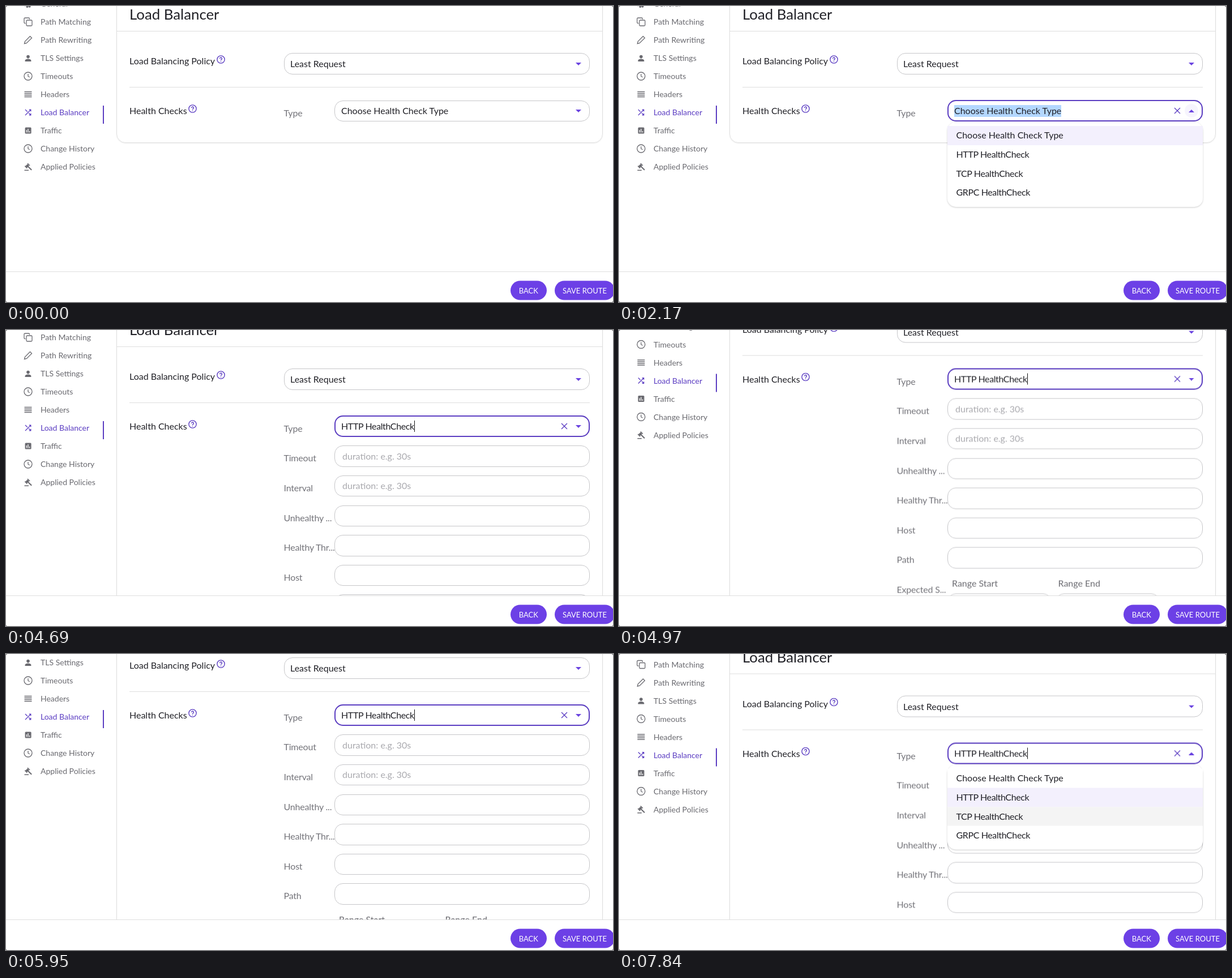
These frames come from a looping animation (1072x523 px, 8 s). An HTML page:

```html
<!DOCTYPE html>
<html lang="en">
<head>
<meta charset="utf-8">
<title>Load Balancer settings</title>
<style>
@property --s { syntax: "<length>"; inherits: true; initial-value: 0px; }

html, body { margin: 0; width: 100%; height: 100%; overflow: hidden; background: #555; }
#stage {
  --line: #dedede; --accent: #5b3dc2; --vivid: #6a43e0;
  position: absolute; inset: 0; overflow: hidden; background: #fff; border-radius: 3px;
  font: 16px/20px Lato, "Open Sans", sans-serif; color: #212127; white-space: nowrap;
  animation: scroll 8s infinite;
}
#stage *, #stage *::after { box-sizing: border-box; }
#stage div, #stage p, #stage svg { position: absolute; margin: 0; }
svg { fill: none; stroke: currentColor; overflow: visible; }

.view { left: 0; top: 0; width: 100%; height: 470px; overflow: hidden; }
.page { inset: 0; transform: translateY(calc(-1 * var(--s))); }
.side { left: 0; top: -20.5px; transform: translateY(calc(-1 * min(var(--s), 124px))); color: #6a6a70; font-size: 14px; }
#stage .side p { position: relative; left: 61px; height: 32px; line-height: 31px; }
.side svg { left: -30.5px; top: 8.5px; width: 16px; height: 16px; stroke-width: 1.3; }
.side .on { color: var(--accent); }
.side .on::after { content: ""; position: absolute; left: 110px; top: 4.5px; width: 2px; height: 32px; background: var(--accent); }

.panel {
  left: 195px; top: -60px; width: 859px; height: 302px; border: 1px solid var(--line);
  border-radius: 16px; box-shadow: 0 1px 2px #0001; animation: grow 8s step-end infinite;
}
.rule { height: 1px; background: var(--line); }
.field { left: 580px; width: 451px; height: 37.5px; border: 1px solid #c6c6c9; border-radius: 15px; background: #fff; }
.field p { left: 11px; top: 7.5px; }
.field .hint { left: 13px; color: #a9a9ae; }
.label { left: 490.5px; color: #74747a; letter-spacing: -.2px; }
.tight { letter-spacing: -.38px; }
.arrow { left: 1006px; width: 10px; height: 5px; fill: var(--vivid); stroke: none; }
.help { width: 15px; height: 15px; color: var(--accent); stroke-width: 1.4; }
.focus { left: 580px; top: 166px; width: 451px; height: 38px; border: 2px solid var(--accent); border-radius: 15px; animation: focus 8s step-end infinite; }
.focus svg { left: 399px; top: 12px; width: 10px; height: 10px; color: var(--accent); stroke-width: 1.4; }
.halo { left: 998.5px; top: 172.5px; width: 24px; height: 24px; border-radius: 50%; background: var(--vivid); opacity: 0; animation: halo 8s infinite; }
.value { left: 592px; top: 174.5px; }
.value span { display: inline-block; height: 21px; }
.caret::after { content: ""; display: inline-block; width: 1px; height: 20px; background: #111; vertical-align: top; animation: blink 8s step-end infinite; }
.first { animation: first 8s step-end infinite; }
.first span { animation: select 8s step-end infinite; }
.second, .rows { animation: second 8s step-end infinite; }
.flip { top: 182.5px; animation: flip 8s step-end infinite; }

.rows { left: 0; top: 219.2px; }
#stage .row { position: relative; height: 52.67px; }
.row .label { top: 12px; }
.row .field { top: 0; }
.sub { color: #6a6a70; }
.pm { width: 20px; height: 20px; color: var(--vivid); stroke-width: 1.6; }
.hover { animation: hover 8s step-end infinite; }

.menu {
  left: 580px; top: 204.5px; width: 451px; height: 150.5px; padding-top: 7.5px; border-radius: 15px;
  background: #fff; box-shadow: 0 1px 3px #0003; animation: menu 8s step-end infinite;
}
#stage .menu p { position: relative; height: 33.8px; padding-left: 15.5px; line-height: 32.6px; }
.o1 { animation: o1 8s step-end infinite; }
.o2 { animation: o2 8s step-end infinite; }
.o3 { animation: o3 8s step-end infinite; }

.foot { left: 0; top: 469px; width: 100%; height: 54px; border-top: 1px solid var(--line); background: #fff; }
.btn {
  top: 15px; height: 34px; border-radius: 17px; background: #6c40e6; transform: translateY(.5px);
  color: #fff; font-size: 13px; line-height: 34px; text-align: center;
}

@keyframes scroll {
  0%, 57.75% { --s: 0px; animation-timing-function: steps(2); }
  59.5% { --s: 30px; animation-timing-function: steps(3); }
  62.125% { --s: 98.5px; animation-timing-function: steps(3); }
  64.75% { --s: 142px; animation-timing-function: steps(4); }
  68.25% { --s: 166px; animation-timing-function: steps(2); }
  70% { --s: 150px; animation-timing-function: steps(5); }
  74.375% { --s: 77px; animation-timing-function: steps(2); }
  76.125% { --s: 42px; animation-timing-function: steps(3); }
  78.75%, 100% { --s: 9.5px; }
}
@keyframes grow { 0% { height: 302px; } 45.5%, 100% { height: 1100px; } }
@keyframes focus { 0% { opacity: 0; } 17.5%, 100% { opacity: 1; } }
@keyframes first { 0% { opacity: 1; } 45.5%, 100% { opacity: 0; } }
@keyframes second { 0% { opacity: 0; } 45.5%, 100% { opacity: 1; } }
@keyframes select { 0% { background: #b3d7ff00; } 18.375%, 100% { background: #b3d7ff; } }
@keyframes blink {
  0%, 18.375%, 52.5%, 65.625%, 78.75%, 91.875% { opacity: 0; }
  17.5%, 45.5%, 58.625%, 71.75%, 84.875%, 98%, 100% { opacity: 1; }
}
@keyframes menu {
  0%, 28%, 45.5% { opacity: 0; }
  22.75%, 32.375%, 89.25%, 100% { opacity: 1; }
}
@keyframes flip {
  0%, 28%, 45.5% { transform: none; }
  22.75%, 32.375%, 89.25%, 100% { transform: rotate(180deg); }
}
@keyframes halo {
  0%, 22.74% { opacity: 0; }
  24.5% { opacity: .12; }
  28%, 32.37% { opacity: .05; }
  34% { opacity: .12; }
  35.875%, 37.62% { opacity: .05; }
  37.625%, 89.24% { opacity: 0; }
  91% { opacity: .12; }
  93.625%, 100% { opacity: 0; }
}
@keyframes hover { 0%, 80.5%, 100% { border-color: #c6c6c9; } 79.625% { border-color: #333; } }
@keyframes o1 { 0% { background: #f3f0fd; } 45.5%, 100% { background: #fff; } }
@keyframes o2 { 0% { background: #fff; } 39.375% { background: #f4f4f4; } 45.5%, 100% { background: #f3f0fd; } }
@keyframes o3 { 0% { background: #fff; } 95.375%, 100% { background: #f4f4f4; } }
</style>
</head>
<body>
<svg width="0" height="0" style="position:absolute">
  <symbol id="clock" viewBox="0 0 16 16"><circle cx="8" cy="8" r="7"/><path d="M8 4v4.2l2.8 1.6"/></symbol>
  <symbol id="ask" viewBox="0 0 15 15"><circle cx="7.5" cy="7.5" r="6.6"/><path d="M5.6 6a1.9 1.9 0 1 1 2.7 1.7q-.8.4-.8 1.3M7.5 10.2v1.3"/></symbol>
  <symbol id="down" viewBox="0 0 10 5"><path d="M0 0h10L5 5z"/></symbol>
</svg>

<div id="stage">
  <div class="view">
    <div class="side">
      <p><svg><circle cx="8" cy="8" r="6" stroke-width="2.4" stroke-dasharray="3 1.7"/><circle cx="8" cy="8" r="5"/><circle cx="8" cy="8" r="2"/></svg>General</p>
      <p><svg><path d="M3.5 10.5h-1A1.5 1.5 0 0 1 1 9V2.5A1.5 1.5 0 0 1 2.5 1H9a1.5 1.5 0 0 1 1.5 1.5v1"/><rect x="5" y="5" width="10" height="10" rx="1.5"/></svg>Path Matching</p>
      <p><svg><path d="M1.5 14.5l1-4 9-9 3 3-9 9z"/></svg>Path Rewriting</p>
      <p><svg style="fill:currentColor;stroke:none"><circle cx="8" cy="5.6" r="2.8"/><path d="M2.6 14v-1.5c0-4 10.8-4 10.8 0V14z"/></svg>TLS Settings</p>
      <p><svg><use href="#clock"/></svg>Timeouts</p>
      <p><svg><path d="M1.5 3.5h13m-13 3h13m-13 3h13m-13 3h13"/></svg>Headers</p>
      <p class="on"><svg><path d="M3 3l3.8 3.8M9.2 9.2L13 13M13 3L3 13M9.8 3.2h3v3M9.8 12.8h3v-3"/></svg>Load Balancer</p>
      <p><svg><rect x="2.6" y="2.6" width="11" height="11" rx="1.5" style="fill:currentColor;stroke:none"/><path d="M5.4 7v4.5M8 5v6.5M10.6 9v2.5" stroke="#fff"/></svg>Traffic</p>
      <p><svg><use href="#clock"/></svg>Change History</p>
      <p><svg><path d="M4.8 8.2l3.6-3.6" stroke-width="4"/><path d="M7 6.8l7.2 7" stroke-width="2"/><path d="M2.4 6.6l4 4M7 2l4 4M1.5 14.2h7.5" stroke-width="1.6"/></svg>Applied Policies</p>
    </div>

    <div class="page">
      <div class="panel"></div>
      <p style="left:218px;top:-1px;font-size:25.8px;line-height:30px">Load Balancer</p>
      <div class="rule" style="left:195px;top:44px;width:858px"></div>

      <p style="left:218px;top:87px">Load Balancing Policy</p>
      <svg class="help" style="left:371.5px;top:86.5px"><use href="#ask"/></svg>
      <div class="field" style="left:490.5px;top:83px;width:540px"><p style="left:10.5px">Least Request</p></div>
      <svg class="arrow" style="top:99.5px"><use href="#down"/></svg>
      <div class="rule" style="left:218px;top:143px;width:813px"></div>

      <p style="left:218px;top:174.5px">Health Checks</p>
      <svg class="help" style="left:321.5px;top:174px"><use href="#ask"/></svg>
      <p class="label" style="top:178.5px">Type</p>
      <div class="field" style="top:166.5px"></div>
      <div class="focus"><svg><path d="M0 0l10 10M10 0L0 10"/></svg></div>
      <div class="halo"></div>
      <svg class="arrow flip"><use href="#down"/></svg>
      <p class="value first caret"><span>Choose Health Check Type</span></p>
      <p class="value second caret tight"><span>HTTP HealthCheck</span></p>

      <div class="rows">
        <div class="row"><p class="label">Timeout</p><div class="field"><p class="hint">duration: e.g. 30s</p></div></div>
        <div class="row"><p class="label">Interval</p><div class="field hover"><p class="hint">duration: e.g. 30s</p></div></div>
        <div class="row"><p class="label">Unhealthy ...</p><div class="field"></div></div>
        <div class="row"><p class="label">Healthy Thr...</p><div class="field"></div></div>
        <div class="row"><p class="label">Host</p><div class="field"></div></div>
        <div class="row"><p class="label">Path</p><div class="field"></div></div>
        <div class="row" style="height:81.8px">
          <p class="label">Expected S...</p>
          <p class="sub" style="left:588px;top:.5px">Range Start</p>
          <p class="sub" style="left:775.5px;top:.5px">Range End</p>
          <div class="field" style="top:29px;width:184px"></div>
          <div class="field" style="left:771px;top:29px;width:184px"></div>
          <svg class="pm" style="left:968px;top:37.5px"><circle cx="10" cy="10" r="9.3"/><path d="M5.5 10h9"/></svg>
          <svg class="pm" style="left:1000px;top:37.5px"><circle cx="10" cy="10" r="9.3"/><path d="M5.5 10h9M10 5.5v9"/></svg>
        </div>
        <div class="row">
          <p class="label">Codec Clie...</p>
          <div class="field"><p>Http 1</p></div>
          <svg class="arrow" style="top:16.5px"><use href="#down"/></svg>
        </div>
      </div>

      <div class="menu">
        <p class="o1">Choose Health Check Type</p>
        <p class="o2 tight">HTTP HealthCheck</p>
        <p class="o3 tight">TCP HealthCheck</p>
        <p class="tight">GRPC HealthCheck</p>
      </div>
    </div>
  </div>

  <div class="foot">
    <div class="btn" style="left:891px;width:63.5px">BACK</div>
    <div class="btn" style="left:969px;width:106px">SAVE ROUTE</div>
  </div>
</div>
</body>
</html>
```
